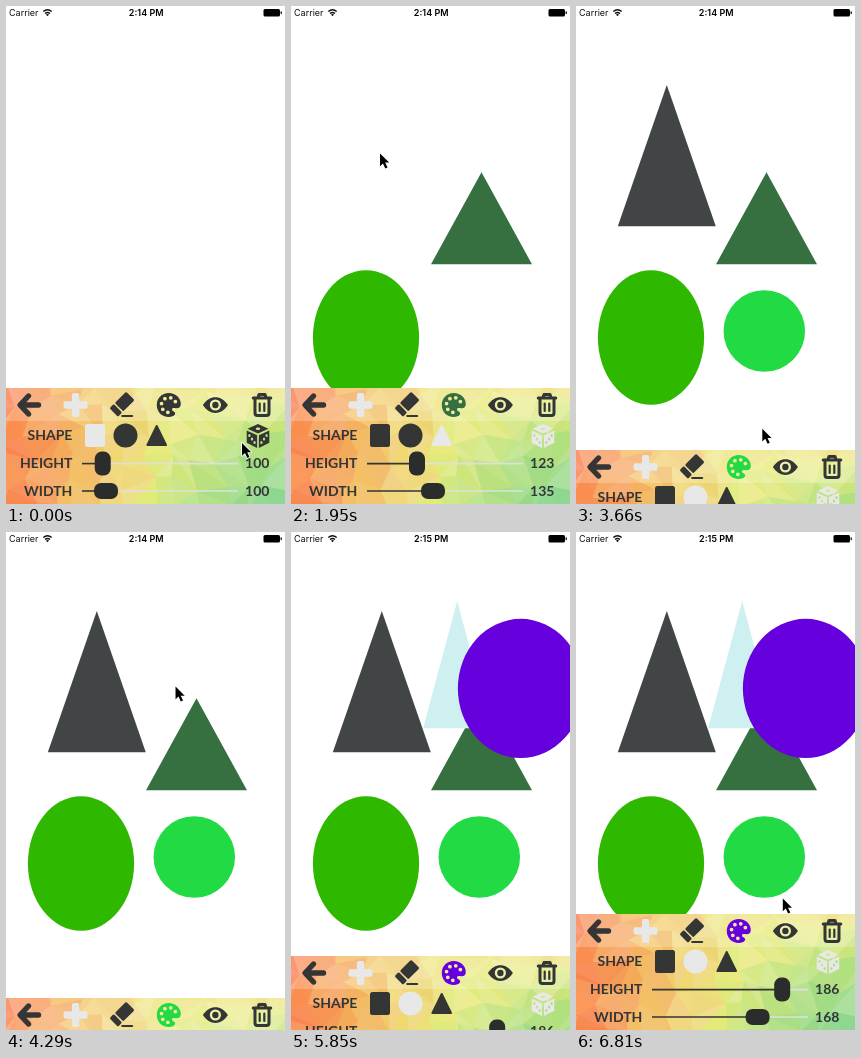
Animation of 279 by 498 pixels, one loop 7350 ms. Source, as an HTML page with a canvas:

```html
<!DOCTYPE html>
<html lang="en">
<head>
<meta charset="utf-8">
<title>Shape canvas</title>
<style>
html, body { margin: 0; width: 279px; height: 498px; overflow: hidden; background: #fff; }
canvas { display: block; }
</style>
</head>
<body>
<canvas id="stage" width="279" height="498"></canvas>
<script>
const ctx = document.getElementById('stage').getContext('2d');
const W = 279, H = 498, LOOP = 7350, STEP = 30;
const PANEL_Y = 382, PANEL_H = 116, BAR_H = 33;
const HIDE = 84, SLIDE = 465;
const DICE_ON = 300, PANEL_DOWN = 3350, PANEL_UP = 5617, MINUTE_CHANGE = 5520;
const DARK = '#343535', LIGHT = '#e8e8e8';
const LABEL = '700 14px Lato, sans-serif';

// A stamp's drawn size follows its slider values w and h.
const SCALE = .748;
const stamp = (at, kind, x, y, w, h, color) => ({ at, kind, x, y, w, h, color });
const stamps = [
  stamp(930, 'circle', 75, 331.5, 142, 180, '#2fb800'),
  stamp(1590, 'triangle', 190.5, 212.2, 135, 123, '#366f40'),
  stamp(2070, 'triangle', 90.8, 149.6, 131, 189, '#424546'),
  stamp(3270, 'circle', 188.3, 325, 109, 109, '#22da44'),
  stamp(4530, 'triangle', 166.2, 132.6, 91, 170, '#cff0f1'),
  stamp(5460, 'circle', 229.7, 156.4, 168, 186, '#6600dc')
];

// The pointer glides from wherever it rests through the given points.
const glides = [];
let rest = [236, 437];
function glide(start, end, ...points) {
  glides.push({ start, end, points: [rest, ...points] });
  rest = points[points.length - 1];
}
const over = i => [stamps[i].x - 1.8, stamps[i].y - 2.2];
glide(0, 180, [247, 429]);
glide(420, 840, over(0));
glide(1170, 1410, over(1));
glide(1770, 1950, over(2));
glide(2250, 2580, [133, 62], [192, 151], [170, 288]);
glide(2730, 2910, over(3));
glide(3270, 3400, [186.3, 422.7]);
glide(3840, 4350, [190, 439], [209, 340], over(4));
glide(4560, 4830, [209, 133]);
glide(5010, 5220, [247, 129]);
glide(5220, 5400, over(5));
glide(5460, 5600, [295, 10]);
glide(6060, 6510, [250, 60], [212, 415]);
glide(6660, 6810, [206.8, 366.5]);

const clamp = v => Math.max(0, Math.min(1, v));
const smooth = p => p * p * (3 - 2 * p);
const mix = (a, b, p) => a + (b - a) * p;

function pointerAt(t) {
  const { start, end, points } = glides.filter(g => g.start <= t).pop();
  const legs = points.length - 1;
  const p = smooth(clamp((t - start) / (end - start))) * legs;
  const i = Math.min(Math.floor(p), legs - 1);
  return [0, 1].map(k => mix(points[i][k], points[i + 1][k], p - i));
}

function panelShift(t) {
  const slide = start => smooth(clamp((t - start) / SLIDE));
  return Math.round(HIDE * (slide(PANEL_DOWN) - slide(PANEL_UP)));
}

function fill(path, color, rule = 'nonzero') {
  ctx.fillStyle = color;
  ctx.fill(path, rule);
}
function disc(x, y, rx, ry = rx) {
  const p = new Path2D();
  p.ellipse(x, y, rx, ry, 0, 0, 2 * Math.PI);
  return p;
}
function box(x, y, w, h, r) {
  const p = new Path2D();
  p.roundRect(x, y, w, h, r);
  return p;
}
function text(str, x, y, font, align = 'left', color = DARK) {
  ctx.font = font;
  ctx.textAlign = align;
  ctx.fillStyle = color;
  ctx.fillText(str, x, y);
}
function line(color, width, d, cap = 'round') {
  ctx.strokeStyle = color;
  ctx.lineWidth = width;
  ctx.lineCap = cap;
  ctx.lineJoin = 'round';
  ctx.stroke(new Path2D(d));
}
function at(x, y, draw) {
  ctx.save();
  ctx.translate(x, y);
  draw();
  ctx.restore();
}

// Low-poly backdrop: a jittered grid, orange at left through yellow to green.
function makeBackdrop() {
  const canvas = document.createElement('canvas');
  canvas.width = W;
  canvas.height = PANEL_H;
  const g = canvas.getContext('2d');
  let seed = 29;
  const rand = () => (seed = seed * 16807 % 2147483647) / 2147483647;
  const shade = (x, y) => {
    const u = clamp(x / W), v = clamp(y / PANEL_H);
    const warm = clamp(u * 1.9), cool = clamp(u * 2 - .9) * v;
    const hue = 19 + 36 * warm + 70 * cool + 8 * (rand() - .5);
    const sat = 95 - 20 * warm - 30 * cool;
    const light = 66 + 6 * warm + 7 * (rand() - .5);
    return `hsl(${hue}, ${sat}%, ${light}%)`;
  };
  const cell = 24, cols = Math.ceil(W / cell) + 2, rows = Math.ceil(PANEL_H / cell) + 2;
  const node = n => (n - 1 + (rand() - .5) * .8) * cell;
  const grid = Array.from({ length: rows + 1 }, (_, j) =>
    Array.from({ length: cols + 1 }, (_, i) => [node(i), node(j)]));
  const facet = (...pts) => {
    const mid = k => (pts[0][k] + pts[1][k] + pts[2][k]) / 3;
    g.fillStyle = g.strokeStyle = shade(mid(0), mid(1));
    g.beginPath();
    pts.forEach(p => g.lineTo(...p));
    g.closePath();
    g.fill();
    g.stroke();
  };
  for (let j = 0; j < rows; j++) {
    for (let i = 0; i < cols; i++) {
      const a = grid[j][i], b = grid[j][i + 1], c = grid[j + 1][i], d = grid[j + 1][i + 1];
      if (rand() < .5) { facet(a, b, d); facet(a, d, c); }
      else { facet(a, b, c); facet(b, d, c); }
    }
  }
  g.fillStyle = 'rgba(255,255,255,.22)';
  g.fillRect(0, 0, W, BAR_H);
  return canvas;
}
const backdrop = makeBackdrop();

function arrow() {
  line(DARK, 5.4, 'M9.5 0H-8M-.5-9L-9 0L-.5 9');
}

function plus() {
  fill(box(-12, -3.7, 24, 7.4, 2), LIGHT);
  fill(box(-3.7, -12, 7.4, 24, 2), LIGHT);
}

function eraser() {
  ctx.save();
  ctx.translate(0, -1);
  ctx.rotate(-Math.PI / 4);
  fill(box(-4.5, -6, 16, 12, 1.5), DARK);
  fill(box(-12, -6, 6, 12, 1.5), DARK);
  ctx.restore();
  line(DARK, 2, 'M0 11H10');
}

function palette(color) {
  const p = new Path2D('M0-12C7-12 12-7 12-1C12 3 9 4 6 3C3 2.5 2 5 5 6.5C8 8 6 12 0 12C-7 12-12 7-12 0C-12-7-7-12 0-12Z');
  for (let i = 0; i < 6; i++) {
    const a = 1.7 + i * .82;
    p.addPath(disc(7.4 * Math.cos(a), 7.4 * Math.sin(a), 1.9));
  }
  fill(p, color, 'evenodd');
}

function eye() {
  const p = new Path2D('M-12.5 0C-6-10.5 6-10.5 12.5 0C6 10.5-6 10.5-12.5 0Z');
  p.addPath(disc(0, 0, 5.6));
  p.addPath(disc(0, 0, 3.2));
  fill(p, DARK, 'evenodd');
}

function trash() {
  line(DARK, 3, 'M-8.8-7H8.8M-4-7.5L-3-10.4H3L4-7.5M-7-5V8Q-7 10.4-4.6 10.4H4.6Q7 10.4 7 8V-5');
  line(DARK, 2.2, 'M-2.3-1.5V6M2.3-1.5V6');
}

function dice(color) {
  const p = new Path2D('M0-12L10.5-7.3L0-2.5L-10.5-7.3ZM-11.3-5.5L-.9-.8V12L-11.3 6.8ZM11.3-5.5L.9-.8V12L11.3 6.8Z');
  p.addPath(disc(0, -7.3, 2.2, 1.3));
  for (const side of [-1, 1]) {
    for (const k of [-1, 0, 1]) p.addPath(disc(side * (6 + 2.6 * k), 3 - 3.4 * k, 1.2, 1.5));
  }
  fill(p, color, 'evenodd');
}

function slider(label, value, y, kw, kh) {
  const x = mix(76 + kw / 2, 232 - kw / 2, (value - 90) / 110);
  text(label, 66.4, y + 4.5, LABEL, 'right');
  text(value, 251.3, y + 4.5, LABEL, 'center');
  line('#dfe0d8', 1.6, `M${x} ${y}H232`, 'butt');
  line(DARK, 1.6, `M76 ${y}H${x}`, 'butt');
  fill(box(x - kw / 2, y - kh / 2, kw, kh, 7), '#2b2c2c');
}

function panel(t, { kind, w, h, color }) {
  const tint = name => name === kind ? LIGHT : DARK;
  ctx.drawImage(backdrop, 0, 0);
  const icons = [arrow, plus, eraser, () => palette(color), eye, trash];
  icons.forEach((icon, i) => at(23 + 46.6 * i, 17, icon));

  text('SHAPE', 66.4, 52, LABEL, 'right');
  fill(box(79, 36, 20, 23, 2.5), tint('square'));
  fill(disc(119.5, 47.5, 12), tint('circle'));
  const tri = 'M150.7 38L160 57H141.4Z';
  fill(new Path2D(tri), tint('triangle'));
  line(tint('triangle'), 2, tri);
  at(252, 48, () => dice(t >= DICE_ON ? LIGHT : DARK));

  slider('HEIGHT', h, 75.6, 16, 24);
  slider('WIDTH', w, 103, 24, 16);
}

function statusBar(t) {
  text('Carrier', 3, 10, '400 9px Inter, sans-serif', 'left', '#111');
  text(t < MINUTE_CHANGE ? '2:14 PM' : '2:15 PM', 140.2, 10, '600 9px Inter, sans-serif', 'center', '#000');
  line('#111', 1.4, 'M37.3 5.6Q41.5 1.8 45.7 5.6M39 7.5Q41.5 5.3 44 7.5', 'butt');
  fill(new Path2D('M41.5 10.2L39.9 8.5Q41.5 7.3 43.1 8.5Z'), '#111');
  fill(box(257.5, 3, 16.5, 7.4, 1.5), '#000');
  fill(box(274.6, 5.2, 1.2, 3, .6), '#000');
}

function drawStamp({ kind, x, y, w, h, color }) {
  const rx = w * SCALE / 2, ry = h * SCALE / 2;
  fill(kind === 'circle' ? disc(x, y, rx, ry)
    : new Path2D(`M${x} ${y - ry}L${x + rx} ${y + ry}H${x - rx}Z`), color);
}

function pointer() {
  const d = 'M0 0V12.8L3 10L5.3 15L7.5 14L5.2 9.2H9.2Z';
  line('#fff', 1.6, d);
  fill(new Path2D(d), '#000');
}

const initial = { kind: 'square', w: 100, h: 100, color: DARK };

function frame(now) {
  const t = Math.floor(now % LOOP / STEP) * STEP;
  const placed = stamps.filter(s => s.at <= t);
  ctx.fillStyle = '#fff';
  ctx.fillRect(0, 0, W, H);
  placed.forEach(drawStamp);
  statusBar(t);
  at(0, PANEL_Y + panelShift(t), () => panel(t, placed[placed.length - 1] || initial));
  at(...pointerAt(t), pointer);
}

const origin = performance.now();
function tick() {
  frame(performance.now() - origin);
  requestAnimationFrame(tick);
}
tick();
</script>
</body>
</html>
```
